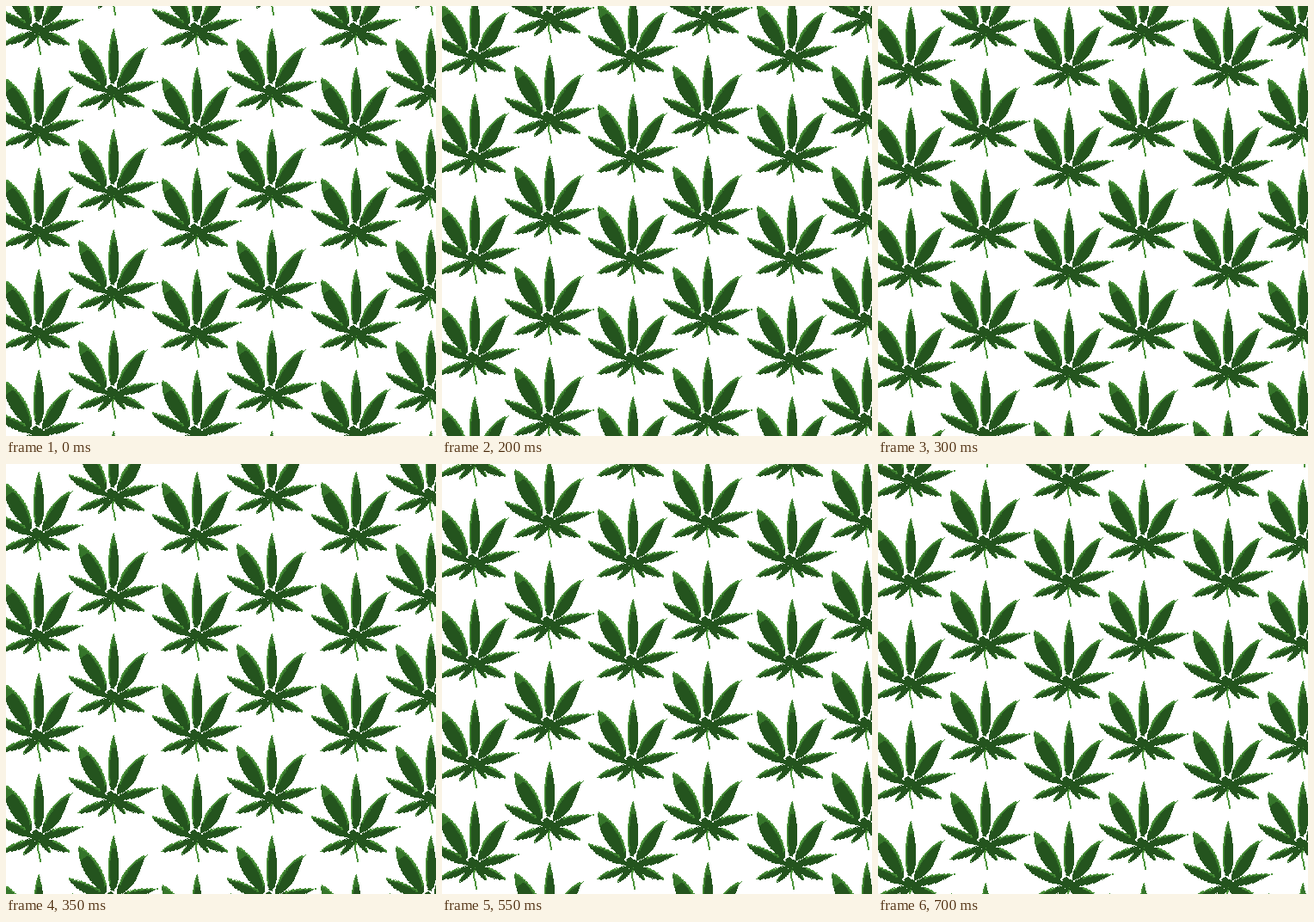
Recreate the animation shown at these times as an HTML page with a canvas. Size 500x500 px, loop 0.75 s.

```html
<!DOCTYPE html>
<html lang="en">
<head>
<meta charset="utf-8">
<title>Falling leaves</title>
<style>
  html, body { margin: 0; width: 100%; height: 100%; overflow: hidden; background: #fff; }
  canvas { display: block; width: 500px; height: 500px; image-rendering: pixelated; }
</style>
</head>
<body>
<canvas id="stage" width="500" height="500"></canvas>
<script>
const SIZE = 500;
const ROW = 117.2, COL = 184.5;      // pattern spacing
const STEP_MS = 50, STEPS = 15;
const DARK = '#24541e', MID = '#35752a', LIGHT = '#4c943a';
const LEAF_W = 112, LEAF_H = 105;

// Leaflet outline around the top tip, and the direction its light comes from
const leaflets = [
  ['M-4 75C-16 77 -33 81 -42 91C-30 91 -16 88 -4 77Z', -1, -2],
  ['M3 75C12 75 29 81 36 91C24 92 12 86 3 77Z', 1, -2],
  ['M-2 78C-8 80 -16 86 -18 94C-12 93 -4 87 0 78Z', -1, -1],
  ['M1 77C7 80 13 86 14 92C8 90 4 85 0 78Z', 1, -1],
  ['M-5 74C-14 62 -30 54 -52 50C-43 64 -28 72 -5 75Z', 1, -2],
  ['M3 75C10 64 28 61 51 62C39 66 33 75 3 76Z', -1, -2],
  ['M-9 67C-21 61 -42 40 -40 13C-22 22 -9 44 -8 63Z', 2, -2],
  ['M4 68C6 50 20 27 39 23C30 27 35 55 6 69Z', -2, -2],
  ['M-2 64C-6 58 -8.5 27 0 0C7.5 27 8 52 1 64Z', -2, -1]
].map(([d, dx, dy]) => ({ path: new Path2D(d), dx, dy }));
const hub = new Path2D('M-8 68L-3 65L1 68L5 69L6 76L-4 78Z');
const stem = new Path2D('M0 77L-1 88L1 95L2 103');
const slit = new Path2D('M1 62h2.5v6h-2.5z');

function makeLeaf() {
  const leaf = document.createElement('canvas');
  leaf.width = LEAF_W;
  leaf.height = LEAF_H;
  const c = leaf.getContext('2d');

  function inside(path, x, y) {
    c.lineWidth = 0.8;
    return c.isPointInPath(path, x, y) || c.isPointInStroke(path, x, y);
  }

  function shade(x, y, i, j) {
    if (c.isPointInPath(slit, x, y)) return null;
    if (c.isPointInPath(hub, x, y)) return DARK;
    const tooth = (((i >> 1) + (j >> 1)) % 3 - 1) * 0.6;
    const reach = Math.hypot(x, y - 73);
    c.lineWidth = 2;
    let color = c.isPointInStroke(stem, x, y) ? LIGHT : null;
    for (const { path, dx, dy } of leaflets) {
      if (!inside(path, x, y + tooth)) continue;
      const lit = n => !inside(path, x + dx * n, y + dy * n + tooth);
      color = DARK;
      if (reach > 17) {
        if (lit(0.6)) color = LIGHT;
        else if (lit(1.1) || reach > 58) color = MID;
      }
    }
    return color;
  }

  for (let j = 0; j < LEAF_H; j++) {
    for (let i = 0; i < LEAF_W; i++) {
      const color = shade(i - LEAF_W / 2 + 0.5, j + 0.5, i, j);
      if (!color) continue;
      c.fillStyle = color;
      c.fillRect(i, j, 1, 1);
    }
  }
  return leaf;
}

const ctx = document.getElementById('stage').getContext('2d');
const leaf = makeLeaf();

function column(x, y) {
  for (let top = y - 2 * ROW; top < SIZE; top += ROW) {
    ctx.drawImage(leaf, Math.round(x) - LEAF_W / 2, Math.round(top));
  }
}

function draw() {
  const step = Math.floor(performance.now() / STEP_MS) % STEPS;
  const shift = step * ROW / STEPS;
  ctx.fillStyle = '#fff';
  ctx.fillRect(0, 0, SIZE, SIZE);
  for (let i = 0; i < 3; i++) {
    column(37.7 + i * COL, 71.2 + shift);
    column(124.7 + i * COL, 25.6 + shift);
  }
  requestAnimationFrame(draw);
}
draw();
</script>
</body>
</html>
```
